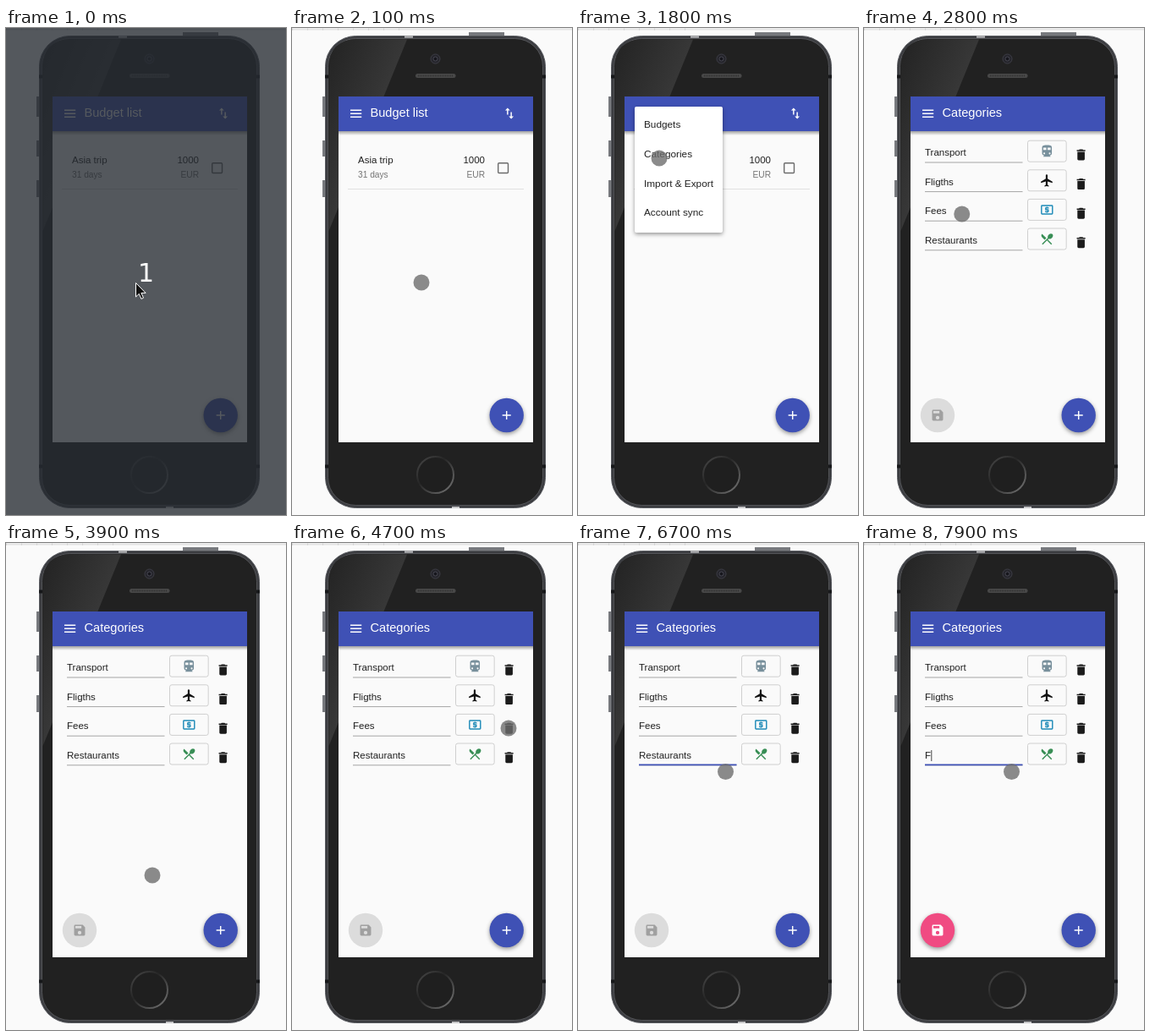
An HTML page for the animation above (8 s loop, 331 by 576 pixels).

```html
<!DOCTYPE html>
<html lang="en">
<head>
<meta charset="utf-8">
<title>Budget app walkthrough</title>
<style>
  html, body { margin: 0; width: 100%; height: 100%; overflow: hidden; background: #fafafa; }
  svg { display: block; width: 331px; height: 576px; }
  text { font-family: "Liberation Sans", Arial, sans-serif; font-size: 11.5px; fill: #212121; white-space: pre; }
  .title { font-size: 14.6px; fill: #fff; }
  .menu text { font-size: 11.8px; }
  .small { font-size: 10.2px; fill: #757575; }
  .end { text-anchor: end; }
  .count { font: 30px "DejaVu Sans", sans-serif; fill: #fff; text-anchor: middle; }
  .raised { filter: drop-shadow(0 2px 2.5px rgba(0, 0, 0, .4)); }
</style>
</head>
<body>
<svg viewBox="0 0 331 576">
  <defs>
    <linearGradient id="gloss" gradientUnits="userSpaceOnUse" x1="43" y1="40" x2="120" y2="72">
      <stop offset="0" stop-color="#252525"/><stop offset="1" stop-color="#393939"/>
    </linearGradient>
    <linearGradient id="ring" x1="0" y1="0" x2="1" y2="1">
      <stop offset="0" stop-color="#4a4a4a"/><stop offset=".4" stop-color="#262626"/><stop offset="1" stop-color="#777"/>
    </linearGradient>
    <linearGradient id="shade" x2="0" y2="1">
      <stop offset="0" stop-opacity=".36"/><stop offset="1" stop-opacity="0"/>
    </linearGradient>
    <linearGradient id="tap">
      <stop offset=".3" stop-color="#8688a0"/><stop offset=".5" stop-color="#45475c"/>
    </linearGradient>
    <path id="trash" d="M6 19c0 1.1.9 2 2 2h8c1.1 0 2-.9 2-2V7H6v12zM19 4h-3.5l-1-1h-5l-1 1H5v2h14V4z"/>
    <path id="train" fill-rule="evenodd" d="M12 2c-4 0-8 .5-8 4v9.5C4 17.43 5.57 19 7.5 19L6 20.5v.5h12v-.5L16.5 19c1.93 0 3.5-1.57 3.5-3.5V6c0-3.5-3.58-4-8-4zM7.5 17a1.5 1.5 0 1 1 0-3 1.5 1.5 0 1 1 0 3zM11 10H6V6h5zM13 10V6h5v4zM16.500 17a1.5 1.5 0 1 1 0-3 1.5 1.5 0 1 1 0 3z"/>
    <path id="plane" d="M21 16v-2l-8-5V3.5c0-.83-.67-1.5-1.5-1.500S10 2.670 10 3.500V9l-8 5v2l8-2.500V19l-2 1.500V22l3.500-1 3.500 1v-1.500L13 19v-5.500l8 2.500z"/>
    <path id="cash" fill-rule="evenodd" d="M11 17h2v-1h1c.55 0 1-.45 1-1v-3c0-.55-.45-1-1-1h-3v-1h4V8h-2V7h-2v1h-1c-.55 0-1 .45-1 1v3c0 .55.45 1 1 1h3v1H9v2h2zM20 4H4a2 2 0 0 0-2 2v12a2 2 0 0 0 2 2h16a2 2 0 0 0 2-2V6a2 2 0 0 0-2-2zM20 18H4V6h16z"/>
    <path id="food" d="M8.100 13.340l2.830-2.830L3.910 3.500c-1.560 1.560-1.560 4.090 0 5.660zM14.880 11.530c1.530.71 3.680.21 5.270-1.380 1.910-1.910 2.280-4.650.81-6.120-1.460-1.460-4.200-1.100-6.120.81-1.590 1.590-2.090 3.740-1.380 5.270L3.700 19.870l1.410 1.410L12 14.410l6.880 6.880 1.410-1.410L13.410 13z"/>
    <path id="disk" fill-rule="evenodd" d="M17 3H5a2 2 0 0 0-2 2v14a2 2 0 0 0 2 2h14a2 2 0 0 0 2-2V7zM12 19a3 3 0 1 1 0-6 3 3 0 1 1 0 6zM15 9H5V5h10z"/>
    <path id="plus" d="M19 13h-6v6h-2v-6H5v-2h6V5h2v6h6z"/>
    <path id="swap" d="M9 3L5 7h3v7h2V7h3zM16 17v-7h-2v7h-3l4 4 4-4z"/>
  </defs>

  <rect width="331" height="576" fill="#fafafa"/>
  <path d="M0 1.500H331" stroke="#e3e3e3" stroke-width="2"/>
  <path d="M0 1.500H135" stroke="#cfcfcf" stroke-width="2" stroke-dasharray="1 17"/>

  <g id="phone">
    <path d="M36 81h4v24h-4zM36 133h4v19h-4zM36 180h4v20h-4zM209 5h42v5h-42z" fill="#77797d"/>
    <rect x="39.500" y="9.500" width="260" height="558" rx="36" fill="#3b3c40" stroke="#55575c"/>
    <rect x="42.500" y="12.500" width="254" height="552" rx="33" fill="#212121" stroke="#5d5f63" stroke-width=".8"/>
    <path d="M43.500 240V46Q44 14 76 13.500H136L108 82H55L55 212z" fill="url(#gloss)"/>
    <path d="M39 57.500h4M296 57.500h4M39 518.500h4M296 518.500h4" stroke="#17181a" stroke-width="4"/>
    <path d="M133 10.500h10M189 567h9" stroke="#c4c4c6" stroke-width="2"/>
    <circle cx="169.500" cy="36.500" r="5.500" fill="#25252b" stroke="#3f3f48"/>
    <circle cx="169.500" cy="36.500" r="2.500" fill="#17171d" stroke="#484853"/>
    <rect x="146" y="54" width="47.500" height="5" rx="2.500" fill="#484848"/>
    <path d="M149 56.500h42" stroke="#303030" stroke-width="2" stroke-dasharray="1 1"/>
    <circle cx="169.500" cy="528.500" r="21.500" fill="#1f1f1f" stroke="url(#ring)" stroke-width="2"/>
  </g>

  <rect x="55" y="81" width="230" height="409" fill="#fafafa"/>
  <rect x="55" y="122" width="230" height="5" fill="url(#shade)"/>
  <rect x="55" y="81" width="230" height="41" fill="#3f51b5"/>
  <path d="M69 97.200h13.200M69 101.200h13.200M69 105.200h13.200" stroke="#fff" stroke-width="1.500"/>
  <text class="title" id="title" x="92.500" y="105"></text>

  <g id="budgets">
    <g id="swapIcon"></g>
    <text x="78" y="160">Asia trip</text>
    <text class="small" x="78" y="177">31 days</text>
    <text class="end" x="228" y="160">1000</text>
    <text class="small end" x="228" y="177">EUR</text>
    <rect x="243.700" y="159.700" width="11.800" height="11.800" rx="1" fill="none" stroke="#6b6b6b" stroke-width="1.400"/>
    <path d="M66 190.500h208" stroke="#e0e0e0"/>
  </g>

  <g id="categories">
    <rect id="selection" x="72" y="245" width="62" height="13.500" fill="#a8c7fa"/>
    <g id="rows"></g>
    <path id="focus" stroke="#3f51b5" stroke-width="1.700"/>
    <path id="caret" stroke="#333" stroke-width=".9"/>
    <circle id="save" cx="87" cy="458" r="20.200"/>
    <g id="saveIcon"></g>
  </g>

  <circle class="raised" cx="253.700" cy="458" r="20.200" fill="#3f51b5"/>
  <g id="plusIcon"></g>

  <g id="menu" class="menu">
    <rect class="raised" x="67" y="93" width="104" height="149" rx="2" fill="#fff"/>
    <text x="78" y="118">Budgets</text>
    <text x="78" y="153">Categories</text>
    <text x="78" y="188">Import &amp; Export</text>
    <text x="78" y="222">Account sync</text>
  </g>

  <circle id="pointer" r="9.500"/>

  <g id="countdown">
    <rect width="331" height="576" fill="#262b31" opacity=".78"/>
    <text class="count" x="165.500" y="299.500">1</text>
    <path d="M153.500 301.500v16.500l3.800-3.600 2.600 6 2.600-1.200-2.600-5.800h5.200z" fill="#111" stroke="#fff"/>
  </g>
</svg>
<script>
const LOOP = 8000, TICK = 100;
const $ = id => document.getElementById(id);

const icon = (name, x, y, fill, scale = .72) =>
  `<use href="#${name}" fill="${fill}" transform="translate(${x} ${y}) scale(${scale}) translate(-12 -12)"/>`;

const rows = [
  ['Transport', 'train', '#78909c'],
  ['Fligths', 'plane', '#111'],
  ['Fees', 'cash', '#1e8bb8'],
  ['Restaurants', 'food', '#388e55'],
];
$('rows').innerHTML = rows.map(([label, name, color], i) => {
  const y = i * 34.6;
  return `<text x="72" y="${151 + y}">${label}</text>
    <path d="M72 ${159 + y}H187.5" stroke="#a5a5a5"/>
    <rect x="193.500" y="${133.2 + y}" width="45.700" height="25" rx="2.500" fill="none" stroke="#cfcfcf"/>
    ${icon(name, 216.3, 145.8 + y, color)}${icon('trash', 256.6, 150 + y, '#1b1b1b')}`;
}).join('');
const field = $('rows').querySelectorAll('text')[3];
$('swapIcon').innerHTML = icon('swap', 257, 101, '#fff');
$('plusIcon').innerHTML = icon('plus', 253.7, 458, '#fff');
$('saveIcon').innerHTML = icon('disk', 87, 458, 'currentColor');

// Each track lists [time, ...values].
const path = [
  [100, 153, 301], [500, 70, 101], [1000, 70, 101], [1400, 90, 146],
  [1500, 90, 146], [1700, 96, 154], [2700, 96, 154], [3100, 175, 418],
  [3800, 175, 418], [3900, 173, 393], [4000, 194, 340], [4200, 260, 223],
  [4300, 260, 223], [4400, 265, 215], [4700, 256, 219], [5200, 123, 340],
  [5300, 113, 378], [5400, 108.5, 400], [5700, 158.5, 251], [6000, 158.5, 251],
  [6500, 174.5, 270.5],
];
const menuFade = [[700, 0], [800, .74], [900, 1], [1800, 1], [2000, 0]];
const menuScale = [[800, .977], [900, 1]];
const focusGrow = [[6000, 0], [6300, 1]];
const saveMix = [[7700, 0], [7900, 1]];

function at(track, t) {
  const i = track.findIndex(k => k[0] > t);
  if (i === 0) return track[0].slice(1);
  if (i < 0) return track[track.length - 1].slice(1);
  const a = track[i - 1], b = track[i], f = (t - a[0]) / (b[0] - a[0]);
  return a.slice(1).map((v, j) => v + (b[j + 1] - v) * f);
}

const within = (t, from, to = LOOP) => t >= from && t < to;
const show = (id, on) => { $(id).style.display = on ? '' : 'none'; };
const set = (id, attrs) => {
  for (const k in attrs) $(id).setAttribute(k, attrs[k]);
};
const mix = (a, b, f) => `rgb(${a.map((v, i) => Math.round(v + (b[i] - v) * f))})`;

function draw(t) {
  const onBudgets = t < 1900, typed = t >= 7800;
  show('countdown', t < 100);
  show('budgets', onBudgets);
  show('categories', !onBudgets);
  $('title').textContent = onBudgets ? 'Budget list' : 'Categories';

  const [fade] = at(menuFade, t), [scale] = at(menuScale, t);
  show('menu', fade > 0);
  set('menu', { opacity: fade, transform: `translate(67 93) scale(${scale}) translate(-67 -93)` });

  const [x, y] = at(path, t), tapped = within(t, 800, 900);
  const pressed = within(t, 5900, 6100) || within(t, 7200, 7400);
  show('pointer', t >= 100);
  set('pointer', {
    cx: x, cy: y,
    fill: tapped ? 'url(#tap)' : pressed ? '#555' : '#6e6e6e',
    'fill-opacity': tapped ? 1 : .8,
    stroke: tapped ? '#c3c5d4' : 'none',
    'stroke-width': 1.5,
  });

  const [grow] = at(focusGrow, t), half = 57.75 * grow;
  show('focus', grow > 0);
  set('focus', { d: `M${129.75 - half} 262.400H${129.75 + half}` });
  field.textContent = typed ? 'F' : 'Restaurants';
  show('selection', within(t, 7300, 7800));
  show('caret', typed || within(t, 6200, 6700) || within(t, 7200, 7300));
  set('caret', { d: `M${typed ? 79.8 : 134.5} 245v13` });

  const [live] = at(saveMix, t);
  set('save', { fill: mix([220, 220, 220], [240, 75, 130], live), class: live ? 'raised' : '' });
  $('saveIcon').style.color = mix([160, 160, 160], [255, 255, 255], live);
}

function frame() {
  const t = performance.now() % LOOP;
  draw(Math.floor(t / TICK) * TICK);
  requestAnimationFrame(frame);
}
frame();
</script>
</body>
</html>
```
